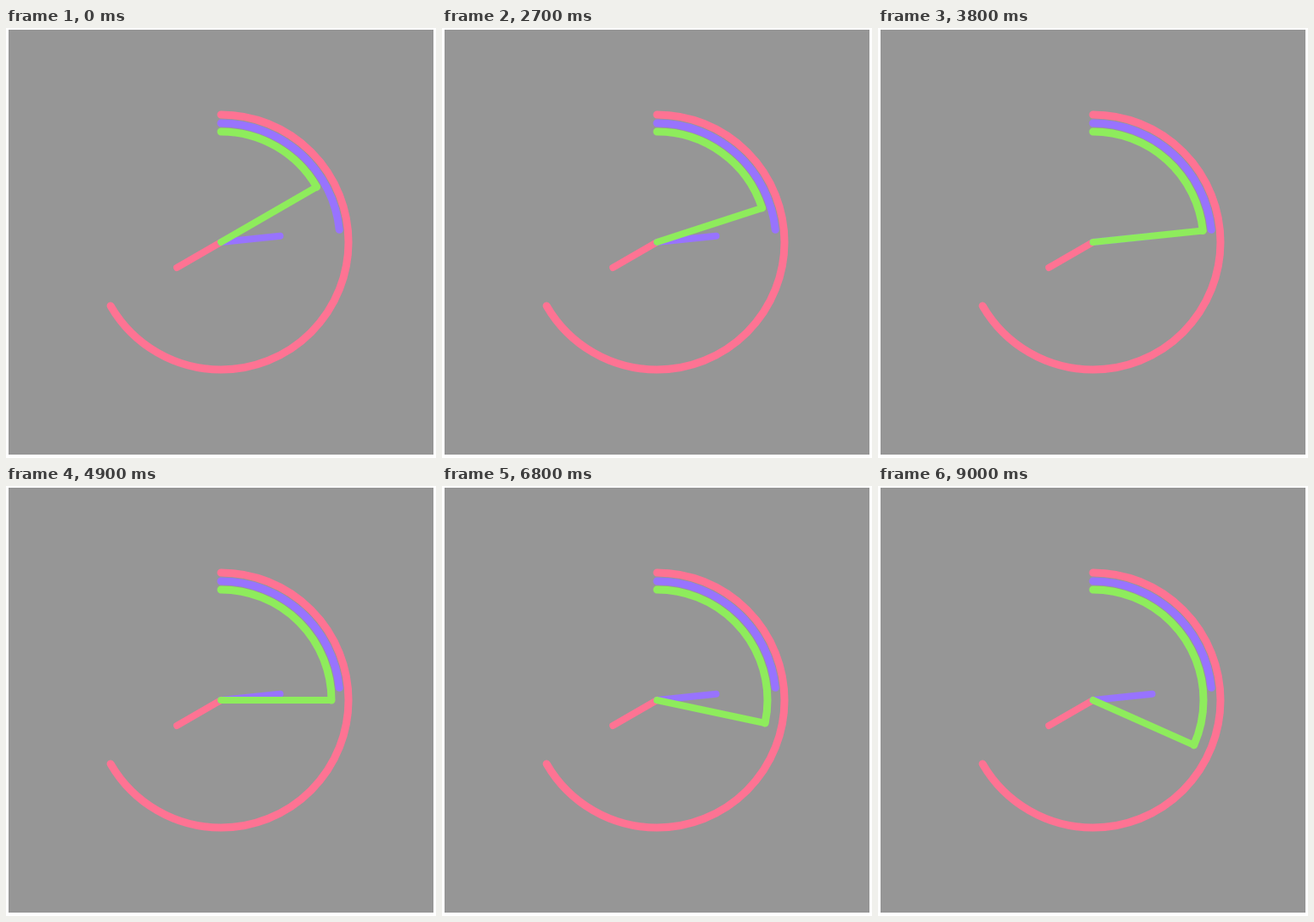
An HTML page with a canvas for the animation above (9.1 s loop, 506 by 506 pixels).

```html
<!DOCTYPE html>
<html>
<head>
<meta charset="utf-8">
<style>
html, body { margin: 0; width: 100%; height: 100%; overflow: hidden; background: #fff; }
canvas { display: block; }
</style>
</head>
<body>
<canvas id="clock" width="506" height="506"></canvas>
<script>
const ctx = document.getElementById('clock').getContext('2d');
const LOOP = 9100, FIRST_TICK = 800;

// Arc from twelve o'clock to the given angle, plus the hand pointing there
function dial(color, radius, length, degrees) {
  const angle = degrees * Math.PI / 180;
  ctx.strokeStyle = color;
  ctx.lineWidth = 9;
  ctx.beginPath();
  ctx.arc(0, 0, radius, -Math.PI / 2, angle - Math.PI / 2);
  ctx.stroke();
  ctx.lineWidth = 8;
  ctx.beginPath();
  ctx.moveTo(0, 0);
  ctx.lineTo(length * Math.sin(angle), -length * Math.cos(angle));
  ctx.stroke();
}

function draw(t) {
  const seconds = 11 + Math.floor((t - FIRST_TICK) / 1000);
  ctx.fillStyle = '#fff';
  ctx.fillRect(0, 0, 506, 506);
  ctx.fillStyle = '#969696';
  ctx.fillRect(3, 2, 500, 500);
  ctx.save();
  ctx.translate(253, 252);
  ctx.lineCap = 'round';
  dial('#fe7393', 150, 60, 8 * 30);
  dial('#9873fe', 140, 70, 14 * 6);
  dial('#8eec5c', 130, 130, seconds * 6);
  ctx.restore();
}

const start = performance.now();
function frame() {
  draw((performance.now() - start) % LOOP);
  requestAnimationFrame(frame);
}
frame();
</script>
</body>
</html>
```
